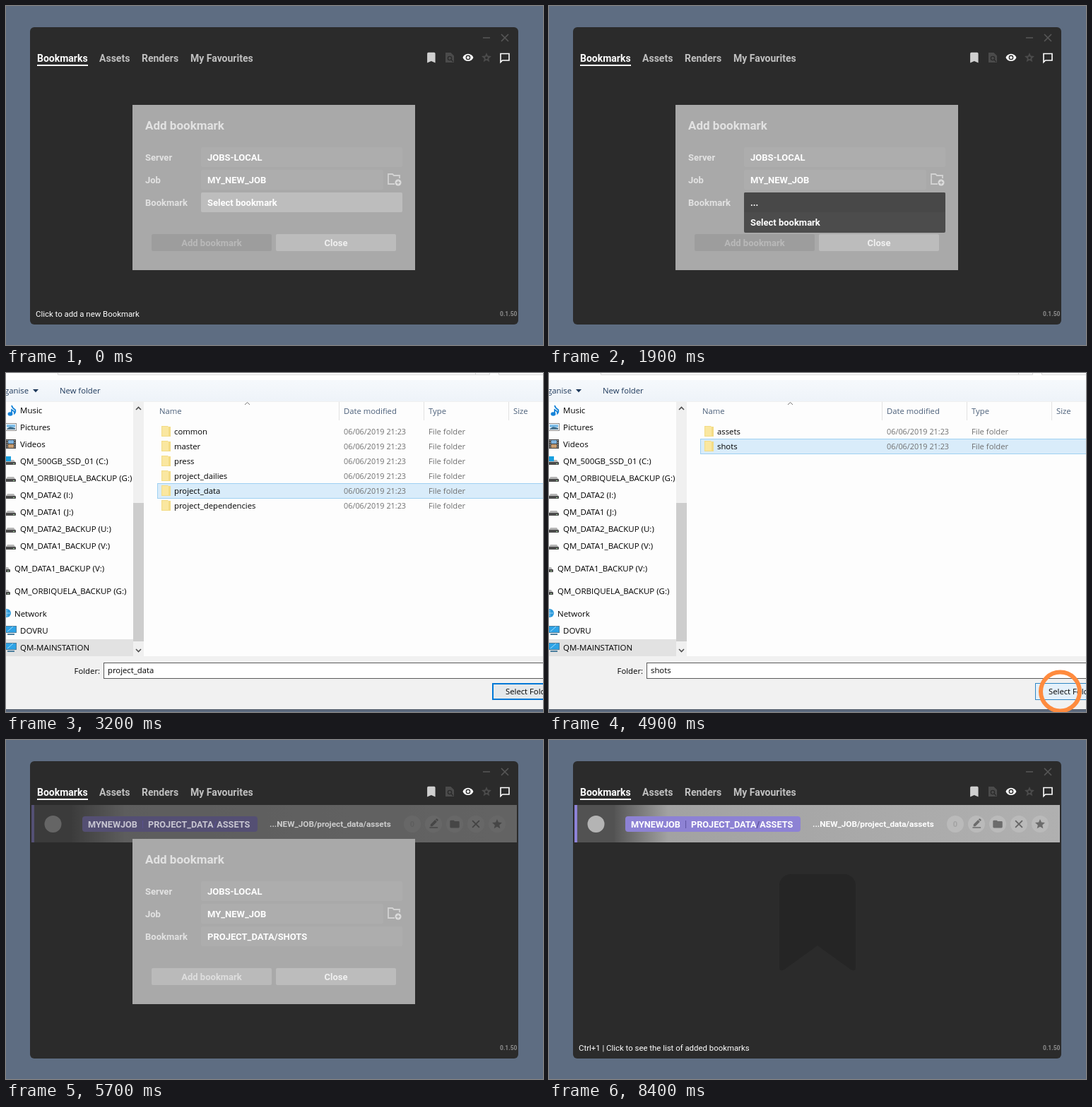
Animation of 760x480 px, one loop 8.5 s. Source, as an HTML page:

```html
<!DOCTYPE html>
<html lang="en">
<head>
<meta charset="utf-8">
<title>Adding a bookmark</title>
<style>
html, body { margin: 0; width: 100%; height: 100%; overflow: hidden; background: #5e6d82; }
svg { display: block; width: 760px; height: 480px; }
text { white-space: pre; }
.app { font: 700 13px Roboto, sans-serif; }
.tabs { font-size: 14px; fill: #c0c0c0; }
.hint { font-size: 11.4px; font-weight: 400; fill: #fff; }
.tag { font-size: 12.7px; }
.path { font-size: 11.75px; }
.mid { text-anchor: middle; }
.files { font: 11.3px "Open Sans", "Noto Sans", sans-serif; transform-origin: 380px 240px; }
.files .end { text-anchor: end; }
.places { font-size: 11.5px; }
.head { fill: #4c607a; }
.meta { fill: #707070; }
.date { font-size: 10.85px; }

/* every part shares one 8.5 s clock */
.a { animation: 8.5s linear infinite both; }
.step { animation-timing-function: step-end; }

.hint-add { animation-name: hintAdd; }
.hint-list { animation-name: hintList; }
.popup { animation-name: popup; }
.before { animation-name: before; }
.after { animation-name: after; }
.dialog { animation-name: dialog; }
.row-back { animation-name: rowBack; }
.row-text { animation-name: rowText; }
.hover { animation-name: hover; }
.files { animation-name: files; }
.root-list { animation-name: rootList; }
.sub-list { animation-name: subList; }
.pick-data { animation-name: pickData; }
.pick-shots { animation-name: pickShots; }
.name-data { animation-name: nameData; }
.name-shots { animation-name: nameShots; }
.focus { animation-name: focus; }
.press { animation-name: press; }
.ring { animation-name: ring; animation-delay: calc((var(--at) - 8500) * 1ms); fill: none; }

@keyframes hintAdd { 0%, .6% { opacity: 1 } 2.2%, 100% { opacity: 0 } }
@keyframes hintList { 0%, 86.5% { opacity: 0 } 88.3%, 100% { opacity: 1 } }
@keyframes popup { 0%, 11.2% { opacity: 0 } 12.3%, 25.8% { opacity: 1 } 26.8%, 100% { opacity: 0 } }
@keyframes before { 0% { opacity: 1 } 58.5%, 100% { opacity: 0 } }
@keyframes after { 0% { opacity: 0 } 58.5%, 100% { opacity: 1 } }
@keyframes dialog { 0%, 67.8% { opacity: 1 } 72.5%, 100% { opacity: 0 } }
@keyframes rowBack { 0%, 25.7% { opacity: 0 } 25.8%, 67.8% { opacity: .43 } 72.5%, 100% { opacity: 1 } }
@keyframes rowText { 0%, 25.7% { opacity: 0 } 25.8%, 67.8% { opacity: .68 } 72.5%, 100% { opacity: 1 } }
@keyframes hover { 0%, 25.8%, 67.8% { opacity: 1 } 72.5%, 95.8% { opacity: .88 } 98.7%, 100% { opacity: 1 } }
@keyframes files {
  0% { opacity: 0; transform: scale(.92) }
  25.882% { opacity: 0; transform: scale(.92); animation-timing-function: cubic-bezier(.215, .61, .355, 1) }
  30.588%, 58.5% { opacity: 1; transform: none }
  62.3%, 100% { opacity: 0; transform: scale(.92) }
}
@keyframes rootList { 0% { opacity: 1 } 39.9%, 100% { opacity: 0 } }
@keyframes subList { 0% { opacity: 0 } 39.9%, 100% { opacity: 1 } }
@keyframes pickData { 0% { opacity: 0 } 36.4% { opacity: 1 } 39.9%, 100% { opacity: 0 } }
@keyframes pickShots { 0% { opacity: 0 } 43.4% { opacity: .5 } 45.8%, 100% { opacity: 1 } }
@keyframes nameData { 0% { opacity: 0 } 36.4% { opacity: 1 } 45.8%, 100% { opacity: 0 } }
@keyframes nameShots { 0% { opacity: 0 } 45.8%, 100% { opacity: 1 } }
@keyframes focus { 0% { opacity: 1 } 36.4%, 100% { opacity: 0 } }
@keyframes press { 0% { opacity: 0 } 54%, 100% { opacity: 1 } }
@keyframes ring {
  0% { r: 18px; stroke: #ff8a3c; stroke-width: 6px; opacity: 0 }
  1.18% { opacity: .9 }
  3.53% { r: 27.3px; stroke: #ff8a3c; stroke-width: 6px; opacity: 1 }
  4.706% { r: 50px; stroke: #fff; stroke-width: 4px; opacity: .95 }
  7.06%, 100% { r: 54px; stroke: #fff; stroke-width: 2px; opacity: 0 }
}
</style>
</head>
<body>
<svg viewBox="0 0 760 480">
  <defs>
    <linearGradient id="fade">
      <stop offset="0" stop-color="#555"/>
      <stop offset=".12" stop-color="#a2a2a2"/>
      <stop offset="1" stop-color="#b0b0b0"/>
    </linearGradient>
    <linearGradient id="bar" x2="0" y2="1">
      <stop offset="0" stop-color="#f6f9fc"/>
      <stop offset="1" stop-color="#eef3f9"/>
    </linearGradient>
    <path id="bookmark" d="M17 3H7a2 2 0 0 0-2 2v16l7-3 7 3V5a2 2 0 0 0-2-2z"/>
    <path id="star" d="M12 17.3l6.2 3.7-1.6-7L22 9.2l-7.2-.6L12 2 9.2 8.6 2 9.2l5.5 4.8-1.7 7z"/>
    <path id="eye" fill-rule="evenodd" d="M12 4.5C7 4.5 2.7 7.6 1 12c1.7 4.4 6 7.5 11 7.5s9.3-3.1 11-7.5C21.3 7.6 17 4.5 12 4.5zM12 17a5 5 0 1 1 0-10 5 5 0 0 1 0 10zm0-8a3 3 0 1 0 0 6 3 3 0 0 0 0-6z"/>
    <path id="folder" d="M10 4H4a2 2 0 0 0-2 2v12a2 2 0 0 0 2 2h16a2 2 0 0 0 2-2V8a2 2 0 0 0-2-2h-8z"/>
    <path id="pencil" d="M3 22h18v-2.4H3zM5 14v4h4L19 8l-4-4zm11-11 4 4 1.5-1.5a1.4 1.4 0 0 0 0-2l-2-2a1.4 1.4 0 0 0-2 0z"/>
    <path id="cross" d="M5 5 19 19M19 5 5 19" stroke-width="2.6"/>
  </defs>

  <rect width="760" height="480" fill="#5e6d82"/>

  <g class="app">
    <rect x="34" y="30" width="691" height="421" rx="6" fill="#2b2b2b"/>
    <path d="M675 45h10M701 40l10 10M711 40l-10 10" stroke="#575757" stroke-width="1.6"/>
    <g class="tabs">
      <text x="44" y="79" fill="#fff">Bookmarks</text>
      <text x="132" y="79">Assets</text>
      <text x="192" y="79">Renders</text>
      <text x="261" y="79">My Favourites</text>
    </g>
    <rect x="44" y="83" width="72" height="2" fill="#fff"/>
    <use href="#bookmark" transform="translate(592 63.3) scale(.82)" fill="#cfcfcf"/>
    <g fill="none" stroke="#4b4b4b" stroke-width="2">
      <path d="M623 67h6l4 4v8h-10z" fill="#4b4b4b"/>
      <circle cx="628" cy="74" r="2.6" stroke="#2b2b2b" stroke-width="1.4"/>
      <path d="M630 76l3 3" stroke="#2b2b2b" stroke-width="1.4"/>
    </g>
    <use href="#eye" transform="translate(645.8 64.8) scale(.68)" fill="#fff"/>
    <use href="#star" transform="translate(671.6 64.6) scale(.7)" fill="#4b4b4b"/>
    <circle cx="680" cy="73.4" r="1.8" fill="#2b2b2b"/>
    <path d="M700 67.5h12v9.5h-9.5l-2.5 2.5z" fill="none" stroke="#fff" stroke-width="1.6"/>

    <path d="M342 190h76a16 16 0 0 1 16 16v115q0 8-7 4l-47-34-47 34q-7 4-7-4V206a16 16 0 0 1 16-16z" fill="#252525"/>

    <g class="a row-back">
      <rect x="36" y="92" width="57" height="53" fill="#525252"/>
      <rect x="36" y="92" width="4" height="53" fill="#8d83d8"/>
      <circle cx="66.5" cy="119" r="12" fill="#b4b4b4"/>
      <rect x="93" y="92" width="630" height="53" fill="url(#fade)"/>
      <g class="a hover">
        <rect x="108" y="108" width="248" height="22" rx="4" fill="#8d82d4"/>
        <g id="buttons" fill="#bababa"></g>
        <text class="mid" x="575" y="123" font-size="11" fill="#a3a3a3">0</text>
        <g fill="#6c6c6c">
          <use href="#pencil" transform="translate(597.5 110.5) scale(.65)"/>
          <use href="#folder" transform="translate(627 111) scale(.67)"/>
          <use href="#cross" transform="translate(656.6 110.6) scale(.7)" stroke="#666"/>
          <use href="#star" transform="translate(686.6 110.6) scale(.7)"/>
        </g>
      </g>
    </g>
    <g class="a row-text" fill="#fff">
      <text class="tag" x="116" y="124">MYNEWJOB</text>
      <text x="192" y="123" font-weight="400" fill="#5c519f">|</text>
      <text class="tag" x="201" y="124">PROJECT_DATA<tspan fill="#5c519f">/</tspan>ASSETS</text>
      <text class="path" x="373" y="123">...NEW_JOB/project_data/assets</text>
    </g>

    <text class="hint a hint-add" x="42" y="440">Click to add a new Bookmark</text>
    <text class="hint a hint-list" x="42" y="440">Ctrl+1 | Click to see the list of added bookmarks</text>
    <text x="699" y="439" font-size="8.5" fill="#8c8c8c">0.1.50</text>

    <g class="a dialog">
      <rect x="179" y="140" width="400" height="234" fill="#a9a9a9"/>
      <g fill="#e2e2e2">
        <text x="197" y="175" font-size="17">Add bookmark</text>
        <text x="197" y="219">Server</text>
        <text x="197" y="251">Job</text>
        <text x="197" y="283">Bookmark</text>
      </g>
      <g fill="#adadad">
        <rect x="276" y="200" width="285" height="28" rx="2"/>
        <rect x="276" y="232" width="258" height="28" rx="2"/>
        <rect x="276" y="264" width="285" height="28" rx="2"/>
      </g>
      <path d="M550 252h-9v-14h6l2 2h8v4" fill="none" stroke="#d2d2d2" stroke-width="1.8"/>
      <circle cx="555" cy="250" r="4.5" fill="#dcdcdc"/>
      <path d="M552.5 250h5M555 247.5v5" stroke="#a9a9a9" stroke-width="1.3"/>
      <rect x="382" y="323" width="170" height="24" rx="2" fill="#bcbcbc"/>
      <g fill="#fff">
        <text x="285" y="219">JOBS-LOCAL</text>
        <text x="285" y="251">MY_NEW_JOB</text>
        <text class="mid" x="467" y="340" fill="#f0f0f0">Close</text>
      </g>
      <g class="a step before">
        <rect x="276" y="264" width="285" height="28" rx="2" fill="#bdbdbd"/>
        <text x="285" y="283" fill="#fff">Select bookmark</text>
        <rect x="206" y="323" width="170" height="24" rx="2" fill="#9d9d9d"/>
        <text class="mid" x="291" y="340" fill="#b9b9b9">Add bookmark</text>
      </g>
      <g class="a step after">
        <text x="285" y="283" fill="#fff">PROJECT_DATA/SHOTS</text>
        <rect x="206" y="323" width="170" height="24" rx="2" fill="#bababa"/>
        <text class="mid" x="291" y="340" fill="#dedede">Add bookmark</text>
      </g>
      <g class="a popup" fill="#fff">
        <rect x="276" y="264" width="285" height="57" rx="2" fill="#4c4c4c"/>
        <rect x="276" y="264" width="285" height="28" rx="2" fill="#484848"/>
        <text x="285" y="283">...</text>
        <text x="285" y="311">Select bookmark</text>
      </g>
    </g>
  </g>

  <g class="a files">
    <rect x="-60" y="-60" width="900" height="537" fill="#fdfdfd"/>
    <path d="M73.5-20V2.5H684.5V-20M664.5-20V2.5M697.5-20V2.5H840" fill="none" stroke="#d9d9d9"/>
    <rect x="-60" y="10" width="900" height="30" fill="url(#bar)"/>
    <rect x="-60" y="40" width="900" height="1" fill="#f0f0f0"/>
    <g fill="#1e395b">
      <text class="end" x="32" y="29">Organise</text>
      <path d="M38 23h8l-4 4.5z"/>
      <text x="76" y="29">New folder</text>
    </g>

    <rect x="-60" y="377" width="240" height="24" fill="#e2e2e2"/>
    <g class="places" id="places"></g>
    <rect x="180" y="41" width="15" height="360" fill="#f0f0f0"/>
    <rect x="180" y="184" width="15" height="196" fill="#cdcdcd"/>
    <path d="M184 52l3.5-3.5 3.5 3.5M184 391l3.5 3.5 3.5-3.5" fill="none" stroke="#505050" stroke-width="1.6"/>

    <path d="M471.5 41v26M591.5 41v26M711.5 41v26" stroke="#e2e2e2"/>
    <path d="M338 45l3.5-3.5 3.5 3.5" fill="none" stroke="#777"/>
    <g class="head">
      <text x="217" y="58">Name</text>
      <text x="478" y="58">Date modified</text>
      <text x="598" y="58">Type</text>
      <text x="718" y="58">Size</text>
    </g>
    <g fill="#d9ecfa" stroke="#9fd0f2">
      <rect class="a step pick-data" x="214.5" y="156.5" width="640" height="21"/>
      <rect class="a step pick-shots" x="214.5" y="93.5" width="640" height="21"/>
    </g>
    <g class="a step root-list" id="root"></g>
    <g class="a step sub-list" id="sub"></g>

    <rect x="-60" y="401" width="900" height="76" fill="#f1f1f1"/>
    <text class="end" x="133" y="426">Folder:</text>
    <rect x="138.5" y="410.5" width="700" height="22" fill="#fff" stroke="#5a5a5a"/>
    <g class="a step focus">
      <rect x="138.5" y="410.5" width="700" height="22" fill="#fff" stroke="#0078d7"/>
      <path d="M144.5 414v15" stroke="#000"/>
    </g>
    <text class="a step name-data" x="144" y="425">project_data</text>
    <text class="a step name-shots" x="144" y="425">shots</text>
    <rect x="689" y="440" width="112" height="22" fill="#e4e8eb" stroke="#0078d7" stroke-width="2"/>
    <g class="a step press">
      <rect x="688" y="439" width="114" height="24" fill="#f1f1f1"/>
      <rect x="688.5" y="439.5" width="113" height="23" fill="#e5f1fb" stroke="#2f86c4"/>
    </g>
    <text x="707" y="455">Select Folder</text>
    <rect x="-60" y="476" width="900" height="1.5" fill="#565f6d"/>
  </g>

  <circle class="a ring" style="--at: 600" cx="287" cy="287"/>
  <circle class="a ring" style="--at: 2000" cx="338" cy="310"/>
  <circle class="a ring" style="--at: 4600" cx="723.5" cy="451"/>
</svg>

<script>
const fill = (id, html) => { document.getElementById(id).innerHTML = html; };

fill('buttons', [0, 1, 2, 3, 4].map(i => `<circle cx="${575 + i * 30}" cy="119" r="12"/>`).join(''));

// Side bar icons, drawn from the left end of the text baseline
const drive = '<path d="M-18-6h9l2 3h-13z" fill="#b5b5b5"/><rect x="-21" y="-3" width="15" height="4" rx="1" fill="#4b4b4b"/><rect x="-10" y="-1" width="2" height="1" fill="#9fd6a0"/>';
const icons = {
  note: '<path d="M-12-11q1 4 5 6 1 3-1 5 0-3-4-5v6" fill="none" stroke="#1583d8" stroke-width="1.8"/><ellipse cx="-14" cy="1" rx="3.5" ry="2.7" fill="#1583d8"/>',
  photo: '<rect x="-20.5" y="-9.5" width="15" height="10" fill="#fff" stroke="#8b8b8b"/><path d="M-19-8h12v4h-12z" fill="#7dbde8"/><path d="M-19-2l5-3 7 2v2h-12z" fill="#46708b"/>',
  film: '<rect x="-20" y="-11" width="14" height="13" fill="#3c3c3c"/><rect x="-17" y="-10" width="8" height="5" fill="#7fb2dc"/><rect x="-17" y="-4" width="8" height="5" fill="#c89d70"/><path d="M-18.5-10v12M-7.5-10v12" stroke="#ddd" stroke-dasharray="1.5 1.5"/>',
  drive,
  system: drive + '<rect x="-20" y="-11" width="7" height="7" fill="#18a0e0"/>',
  net: '<circle cx="-11" cy="-5" r="6" fill="#2e9bdc"/><path d="M-16-5h10M-11-10v10" stroke="#9ed5f5"/>',
  screen: '<rect x="-20.5" y="-10.5" width="15" height="9" fill="#2ea3e6" stroke="#4d7f9e"/><path d="M-18-3l8-7" stroke="#a9defa"/><path d="M-18 1h10" stroke="#4d7f9e" stroke-width="2"/>'
};
const places = [
  ['note', 'Music', 20, 57],
  ['photo', 'Pictures', 20, 81],
  ['film', 'Videos', 20, 105],
  ['system', 'QM_500GB_SSD_01 (C:)', 20, 129],
  ['drive', 'QM_ORBIQUELA_BACKUP (G:)', 20, 153],
  ['drive', 'QM_DATA2 (I:)', 20, 177],
  ['drive', 'QM_DATA1 (J:)', 20, 201],
  ['drive', 'QM_DATA2_BACKUP (U:)', 20, 225],
  ['drive', 'QM_DATA1_BACKUP (V:)', 20, 249],
  ['drive', 'QM_DATA1_BACKUP (V:)', 12, 281],
  ['drive', 'QM_ORBIQUELA_BACKUP (G:)', 12, 313],
  ['net', 'Network', 12, 345],
  ['screen', 'DOVRU', 20, 369],
  ['screen', 'QM-MAINSTATION', 20, 393]
];
fill('places', places.map(([icon, name, x, y]) =>
  `<g transform="translate(${x} ${y})">${icons[icon]}<text>${name}</text></g>`).join(''));

const folderRow = (name, i) => `<g transform="translate(0 ${87 + i * 21})">
  <path d="M220-12h9l1 1h3v14h-13z" fill="#f3dc86"/>
  <path d="M221-11h9v13h-9z" fill="#fae7a0"/>
  <text x="238">${name}</text>
  <text class="meta date" x="478">06/06/2019 21:23</text>
  <text class="meta" x="598">File folder</text></g>`;
const list = (id, names) => fill(id, names.map(folderRow).join(''));
list('root', ['common', 'master', 'press', 'project_dailies', 'project_data', 'project_dependencies']);
list('sub', ['assets', 'shots']);
</script>
</body>
</html>
```
